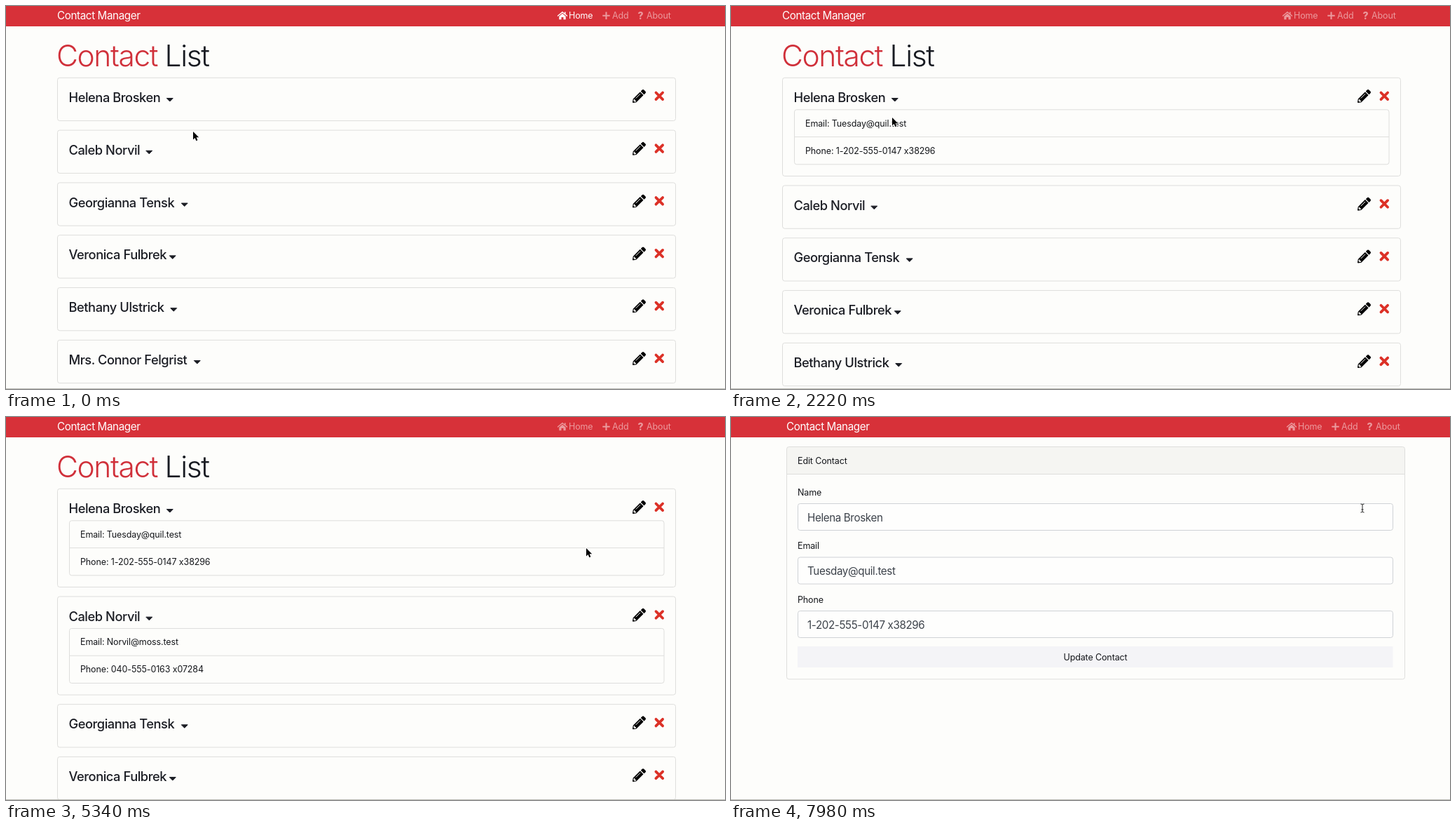
An HTML page for the animation above (8000 ms loop, 1026 px wide and 546 px high).

```html
<!DOCTYPE html>
<html lang="en">
<head>
<meta charset="utf-8">
<title>Contact Manager</title>
<style>
  html, body { margin: 0; width: 100%; height: 100%; overflow: hidden; background: #fdfdfb; }
  svg { display: block; width: 100%; height: 100%; }
  text { font: 12.5px Inter, "Open Sans", sans-serif; letter-spacing: -.01em; font-optical-sizing: none; fill: #15171b; }
  .brand { font-size: 15.2px; letter-spacing: -.025em; fill: #fff; }
  .title { font-size: 42.5px; font-weight: 300; letter-spacing: -.033em; fill: #181b22; }
  .title tspan { fill: #d0303a; }
  .name { font-size: 18.3px; font-weight: 500; letter-spacing: -.025em; fill: #1b1d24; }
  .value { font-size: 15.2px; letter-spacing: -.025em; fill: #3c424a; }
  .nav text { fill: #fff; }
  .nav .mark { font-size: 14px; font-weight: 800; }
  .box { fill: none; stroke: #dededc; }
  .input { fill: #fefefd; stroke: #cfd2d6; }
</style>
</head>
<body>
<svg viewBox="0 0 1026 546">
  <defs>
    <g id="pencil">
      <path d="M18.5 5.3l-1.7 1.7q-.3.3-.6 0l-4.1-4.1q-.3-.3 0-.6l1.7-1.7q1.3-1.1 2.5 0l2.2 2.2q1.2 1.3 0 2.5z
               M10.6 3.7L.8 13.5 0 18q0 1 1 1l4.5-.8 9.8-9.8q.3-.3 0-.6l-4.1-4.1q-.3-.3-.6 0z"/>
      <path d="M3.3 15.8h1.8v1.4l-2.4.4-1.2-1.2.4-2.4h1.4z" fill="#fdfdfb"/>
      <path d="M5 12.3l5.8-5.8" stroke="#fdfdfb" stroke-linecap="round"/>
    </g>
    <path id="cross" d="M-4.8-4.8L4.8 4.8M4.8-4.8L-4.8 4.8" stroke="#dc3127" stroke-width="3.8" stroke-linecap="round"/>
    <path id="caret" d="M.8.5H9.7L5.25 5z" fill="#1b1d24" stroke="#1b1d24" stroke-linejoin="round"/>
    <path id="arrow" d="M0 0V11.4l2.6-2.4 1.8 4.2 2-.9-1.8-4h3.6z" stroke="#fff" stroke-width="1.4" paint-order="stroke"/>
    <path id="hand" fill="#fff" stroke="#111" stroke-linejoin="round"
      d="M-1.2 1Q0-.6 1.2 1V5Q2.4 4.2 3.3 5.2 4.5 4.6 5.3 5.8 7 5.6 7 7.2V9.5Q6.8 11 6 12.5H-.2Q-1.2 10.5-3.8 8-4.2 6.3-2.6 6.8L-1.2 8zM1.2 5V7M3.3 5.2V7.2M5.3 5.8V7.6"/>
    <path id="beam" fill="none" stroke="#222"
      d="M-2.5-6Q0-6 0-4.5 0-6 2.5-6M0-4.5V4.5M-2.5 6Q0 6 0 4.5 0 6 2.5 6M-1.5 2H1.5"/>
  </defs>
  <g id="page"></g>
  <use id="cursor"/>
  <path d="M0 545.5H1026" stroke="#bdbdb6"/>
</svg>
<script>
const LOOP = 8000, BLUR = 1460, OPEN_FIRST = 1550, OPEN_SECOND = 4500, EDIT = 6900;

// name, caret x, email, phone
const contacts = [
  ['Helena Brosken', 228.5, 'Tuesday@quil.test', '1-202-555-0147 x38296'],
  ['Caleb Norvil', 199, 'Norvil@moss.test', '040-555-0163 x07284'],
  ['Georgianna Tensk', 249.5],
  ['Veronica Fulbrek', 232.5],
  ['Bethany Ulstrick', 234],
  ['Mrs. Connor Felgrist', 267.5]
];

// time, x, y
const path = [
  [0, 267, 179], [750, 234, 139.5], [1850, 234, 139.5], [2220, 230, 159], [3150, 207, 290.5],
  [4650, 207, 290.5], [5340, 828, 187], [5850, 903, 132.5], [6900, 903, 132.5], [7500, 901, 130], [LOOP, 901, 130]
];
const shapes = [[0, 'arrow'], [640, 'hand'], [2080, 'arrow'], [3050, 'hand'], [4760, 'arrow'], [5780, 'hand'], [EDIT, 'beam']];

const text = (x, y, s, cls = '', more = '') => `<text x="${x}" y="${y}" class="${cls}" ${more}>${s}</text>`;
const box = (x, y, w, h, cls = 'box') => `<rect x="${x}" y="${y}" width="${w}" height="${h}" rx="3.2" class="${cls}"/>`;
const use = (id, x, y) => `<use href="#${id}" x="${x}" y="${y}"/>`;

function header(homeLit) {
  return text(73, 19, 'Contact Manager', 'brand') +
    `<g class="nav"><g opacity="${homeLit ? 1 : .5}">
      <path d="M787.5 14L794 8.6 800.5 14" fill="none" stroke="#fff" stroke-width="1.4" stroke-linecap="round"/>
      <path d="M789.3 14.7L794 10.8 798.7 14.7V19.2H795.5V16H792.5V19.2H789.3zM797 8.6h1.6v3.2l-1.6-1.4z" fill="#fff"/>
      ${text(803, 18.3, 'Home')}</g>
    <g opacity=".5"><path d="M851.3 13.7H861.7M856.5 8.5V18.9" stroke="#fff" stroke-width="2.1"/>
      ${text(865, 18.3, 'Add')}${text(901.5, 18.8, '?', 'mark')}${text(914, 18.3, 'About')}</g></g>`;
}

function listPage(open) {
  let y = 102.3;
  const cards = contacts.map(([name, caretX, email, phone], i) => {
    const isOpen = i < open, extra = isOpen ? 78.85 : 0, top = y;
    y += 74.8 + extra;
    return box(73.5, top, 882, 61.3 + extra) + text(89.5, top + 34.7, name, 'name') +
      use('caret', caretX, top + 28.7) + use('pencil', 894, top + 16.7) + use('cross', 932.3, top + 26) +
      (isOpen ? box(90.5, top + 45.5, 848.5, 78) + `<path class="box" d="M90.5 ${top + 84.3}H939"/>` +
        text(106, top + 69.4, 'Email: ' + email) + text(106, top + 108.4, 'Phone: ' + phone) : '');
  });
  return text(72, 85.5, '<tspan>Contact</tspan> List', 'title') + cards.join('');
}

function editPage() {
  const [name, , email, phone] = contacts[0];
  const fields = [['Name', name], ['Email', email], ['Phone', phone]].map(([label, value], i) => {
    const y = 123.5 + i * 76.5;
    return text(95, y - 11.6, label) + box(95.5, y, 849, 38, 'input') + text(109, y + 25.2, value, 'value');
  });
  return '<path d="M80 43H961V81H80z" fill="#f5f5f2"/>' + box(79.5, 42.5, 882, 331.3) +
    '<path class="box" d="M79.5 81.5H961.5"/>' + text(95, 66.5, 'Edit Contact') + fields.join('') +
    '<path d="M95 327H944.5V357H95z" fill="#f4f4f7"/>' +
    text(520, 347, 'Update Contact', '', 'text-anchor="middle"');
}

const page = document.getElementById('page'), cursor = document.getElementById('cursor');
let shown;

function drawPage(t) {
  const edit = t >= EDIT, open = (t >= OPEN_FIRST) + (t >= OPEN_SECOND), lit = t < BLUR;
  const key = [edit, open, lit].join();
  if (key === shown) return;
  shown = key;
  page.innerHTML = '<path d="M0 0H1026V29H0z" fill="#d73139"/>' +
    `<g transform="translate(${edit ? 6 : 0})">${header(lit)}</g>` + (edit ? editPage() : listPage(open));
}

function drawCursor(t) {
  const i = path.findIndex(p => p[0] > t), [t0, x0, y0] = path[i - 1], [t1, x1, y1] = path[i];
  const u = (t - t0) / (t1 - t0), k = u * u * (3 - 2 * u);
  cursor.setAttribute('href', '#' + shapes.filter(s => s[0] <= t).pop()[1]);
  cursor.setAttribute('transform', `translate(${x0 + (x1 - x0) * k} ${y0 + (y1 - y0) * k})`);
}

const start = performance.now();
function frame() {
  const t = (performance.now() - start) % LOOP;
  drawPage(t);
  drawCursor(t);
  requestAnimationFrame(frame);
}
frame();
</script>
</body>
</html>
```
